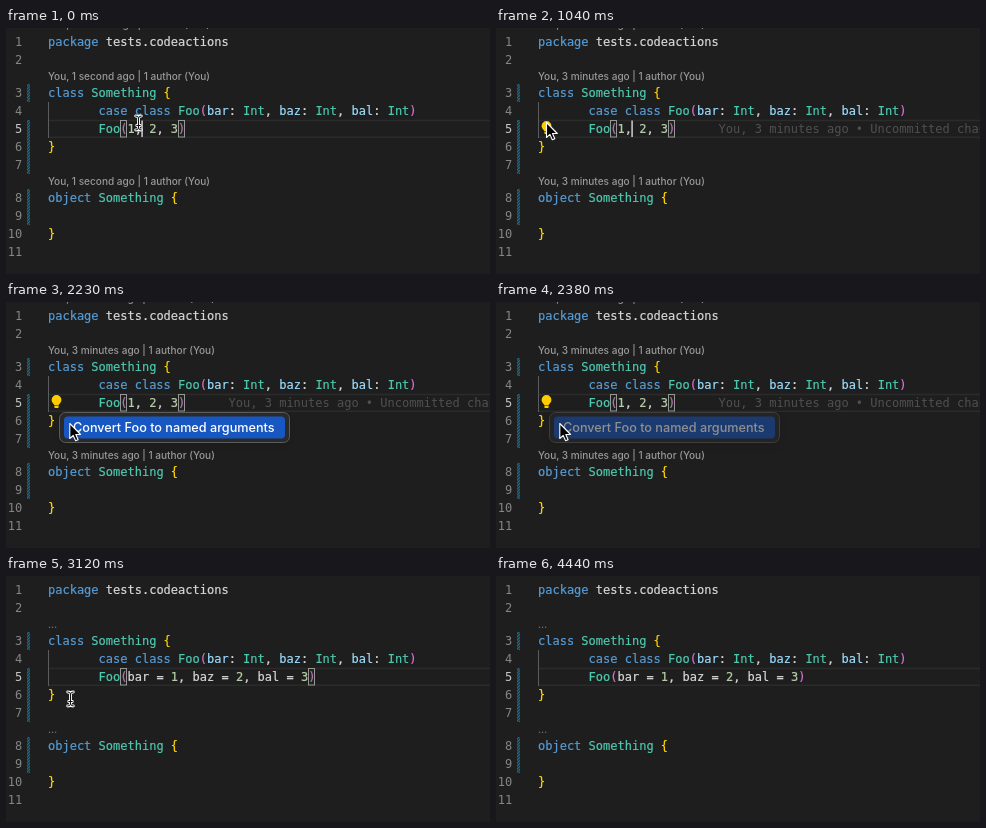
Write an HTML page that moves like this. It is 484 px wide and 246 px high and loops after 4460 ms.

```html
<!DOCTYPE html>
<html lang="en">
<head>
<meta charset="utf-8">
<title>Convert to named arguments</title>
<style>
  html, body { margin: 0; width: 100%; height: 100%; overflow: hidden; background: #1e1e1e; }
  svg { display: block; width: 484px; height: 246px; }
  text { white-space: pre; }
  .code { font: 12px "DejaVu Sans Mono", monospace; }
  .ui { font-family: Inter, sans-serif; font-weight: 500; }
</style>
</head>
<body>
<svg id="stage" viewBox="0 0 484 246" xmlns="http://www.w3.org/2000/svg">
  <defs>
    <pattern id="hatch" width="3" height="3" patternUnits="userSpaceOnUse" patternTransform="translate(0 1.25)">
      <path d="M-1 1L1 -1M-1 4L4 -1M2 4L4 2" stroke="#1b81a8" stroke-width="1.06"/>
    </pattern>
    <path id="ibeam" d="M-2.8 -7Q0 -7 0 -5V5Q0 7 -2.8 7M2.8 -7Q0 -7 0 -5M2.8 7Q0 7 0 5M-1.8 2.5H1.8"/>
    <filter id="shadow" x="-10%" y="-40%" width="120%" height="200%">
      <feDropShadow dx="0" dy="3" stdDeviation="5" flood-color="#000" flood-opacity=".12"/>
    </filter>
  </defs>
  <rect width="484" height="246" fill="#1e1e1e"/>
  <path d="M42 92.5H484M42 109.25H484" stroke="#2b2b2b" stroke-width="1.5"/>
  <path d="M42.5 74V110" stroke="#5c5c5c"/>
  <g fill="url(#hatch)">
    <rect x="21" y="56" width="3" height="18"/>
    <rect x="21" y="92" width="3" height="54"/>
    <rect x="21" y="161" width="3" height="36"/>
  </g>
  <g id="lenses" class="ui"></g>
  <g id="lines" class="code"></g>
  <g id="brackets" fill="#0064001a" stroke="#969696">
    <rect x="114.5" y="92.5" width="6" height="16.5"/>
    <rect id="close" y="92.5" width="6" height="16.5"/>
  </g>
  <text id="blame" class="code" x="222.6" y="105" fill="#505050">You, 3 minutes ago • Uncommitted changes</text>
  <rect id="caret" y="92.5" width="1.6" height="16.5" fill="#c4c5c3"/>
  <g id="bulb" fill="#ffcc00">
    <path d="M48.3 103.2C48.3 101.6 45.6 100.9 45.6 97.9A4.9 4.9 0 0 1 55.4 97.9C55.4 100.9 52.7 101.6 52.7 103.2Z"/>
    <path d="M48.4 103.8H52.6V105.2Q52.6 106 51.8 106H49.2Q48.4 106 48.4 105.2Z"/>
  </g>
  <g id="menu" class="ui">
    <rect x="53.5" y="110.5" width="230" height="30" rx="6" fill="#2a2a2c" stroke="#5b5b5d" filter="url(#shadow)"/>
    <rect x="58" y="114.5" width="221" height="22" rx="4" fill="#1757c2"/>
    <text x="67" y="130" font-size="12.65" fill="#fff">Convert Foo to named arguments</text>
  </g>
  <g id="beam" fill="none" stroke-linecap="round">
    <use href="#ibeam" stroke="#fff" stroke-width="2.8"/>
    <use href="#ibeam" stroke="#111"/>
  </g>
  <path id="arrow" d="M0 0V15L3.4 11.9L5.8 17.3L8.3 16.2L6 11H10.8Z"
    fill="#000" stroke="#fff" stroke-width="1.1" stroke-linejoin="round"/>
  <g id="hand">
    <g transform="scale(1.12 1.05)" stroke="#000" stroke-width=".6" stroke-linejoin="round">
      <path fill="#fff" d="M3.2 8.6V1.4Q3.2 0 4.4 0T5.6 1.4V5Q6.9 4.2 7.8 5.3Q9.1 4.7 9.9 5.9Q11.8 5.5 11.8 7.4V9.4Q11.8 11 10.8 12.3V14.2H4.4V12.8L.6 8.6Q-.3 7.4 .8 6.8Q1.8 6.4 3.2 8.6Z"/>
      <path fill="none" d="M5.9 9V12M7.7 9V12M9.5 9V12"/>
    </g>
  </g>
</svg>
<script>
const $ = id => document.getElementById(id);
const LOOP = 4460, CHAR = 7.224, LEFT = 42, INDENT = LEFT + 7 * CHAR;
const BLUE = "#569cd6", TEAL = "#4ec9b0", GOLD = "#ffd700", PINK = "#da70d6",
      PLAIN = "#d8d8d8", PARAM = "#9cdcfe", NUM = "#b5cea8";

function add(parent, tag, attrs, content = "") {
  const el = document.createElementNS("http://www.w3.org/2000/svg", tag);
  for (const k in attrs) el.setAttribute(k, attrs[k]);
  el.textContent = content;
  parent.append(el);
  return el;
}

// parts: colour, text, colour, text...
function line(x, y, ...parts) {
  const el = add($("lines"), "text", { x, y, "stroke-width": 0.2 });
  for (let i = 0; i < parts.length; i += 2) {
    add(el, "tspan", { fill: parts[i], stroke: parts[i] }, parts[i + 1]);
  }
  return el;
}

const baselines = [18, 36, 69, 87, 105, 123, 141, 174, 192, 210, 228];
baselines.forEach((y, i) => add($("lines"), "text",
  { x: 16.3, y, "text-anchor": "end", fill: i === 4 ? "#c6c6c6" : "#858585" }, i + 1));

const params = ["bar", "baz", "bal"];
const commas = groups => groups.flatMap((g, i) => i ? [PLAIN, ", ", ...g] : g);
const call = named => line(INDENT, 105, TEAL, "Foo", PINK, "(",
  ...commas(params.map((p, i) => [PLAIN, named ? p + " = " : "", NUM, i + 1])), PINK, ")");

line(LEFT, 18, BLUE, "package", PLAIN, " tests.codeactions");
line(LEFT, 69, BLUE, "class ", TEAL, "Something ", GOLD, "{");
line(INDENT, 87, BLUE, "case class ", TEAL, "Foo", PINK, "(",
  ...commas(params.map(p => [PARAM, p, PLAIN, ": ", TEAL, "Int"])), PINK, ")");
line(LEFT, 123, GOLD, "}");
line(LEFT, 174, BLUE, "object ", TEAL, "Something ", GOLD, "{");
line(LEFT, 210, GOLD, "}");
const before = call(false), after = call(true);

const lenses = [0.3, 51.5, 156.5].map(y => add($("lenses"), "text", { x: LEFT, y, "font-size": 10.05 }));

// time, pointer, x, y
const pointer = [
  [0, "beam", 132.5, 95], [600, "beam", 81.5, 90], [740, "beam", 70.5, 93],
  [890, "arrow", 46.8, 95], [1040, "arrow", 50.5, 94.5], [1190, "arrow", 49.5, 98],
  [1340, "arrow", 49, 102.5], [1490, "arrow", 57.5, 115.5], [1640, "arrow", 61.5, 119.5],
  [1790, "arrow", 63.8, 121.5], [2530, "hand", 60, 123.5], [2820, "beam", 64.5, 123],
  [3560, "beam", 84.5, 134], [3710, "beam", 181.5, 182], [3860, "beam", 340.5, 221],
  [4000, "beam", 440.5, 241], [4150, "beam", 447.5, 252], [4300, "beam", 448.5, 253],
  [4440, "none", 0, 0]
];
const blinks = [600, 890, 1340, 1790, 2230, 2670, 3120, 3560, 4150];

const show = (el, on) => el.setAttribute("visibility", on ? "visible" : "hidden");

function draw(t) {
  const during = (a, b) => t >= a && t < b;
  const edited = t >= 2670;
  const age = t < 300 ? "1 second" : "3 minutes";
  const folded = t >= 3120;

  for (const lens of lenses) {
    lens.textContent = folded ? "…" : `You, ${age} ago | 1 author (You)`;
    lens.setAttribute("fill", folded ? "#777" : "#999");
  }
  show(lenses[0], !folded);
  show(before, !edited);
  show(after, edited);
  show($("brackets"), t < 4440);
  $("close").setAttribute("x", edited ? 302.5 : 172.5);
  show($("blame"), during(150, 2670));
  show($("bulb"), during(150, 2820));
  $("caret").setAttribute("x", edited ? 178.4 : 135.3);
  show($("caret"), blinks.filter(b => b <= t).length % 2 === 0);
  show($("menu"), during(1190, 2530));
  $("menu").setAttribute("opacity", t < 2380 ? 1 : 0.5);

  const [, kind, x, y] = pointer.findLast(p => p[0] <= t);
  for (const id of ["beam", "arrow", "hand"]) {
    show($(id), id === kind);
    $(id).setAttribute("transform", `translate(${x} ${y})`);
  }
}

const start = performance.now();
function tick() {
  draw((performance.now() - start) % LOOP);
  requestAnimationFrame(tick);
}
tick();
</script>
</body>
</html>
```
